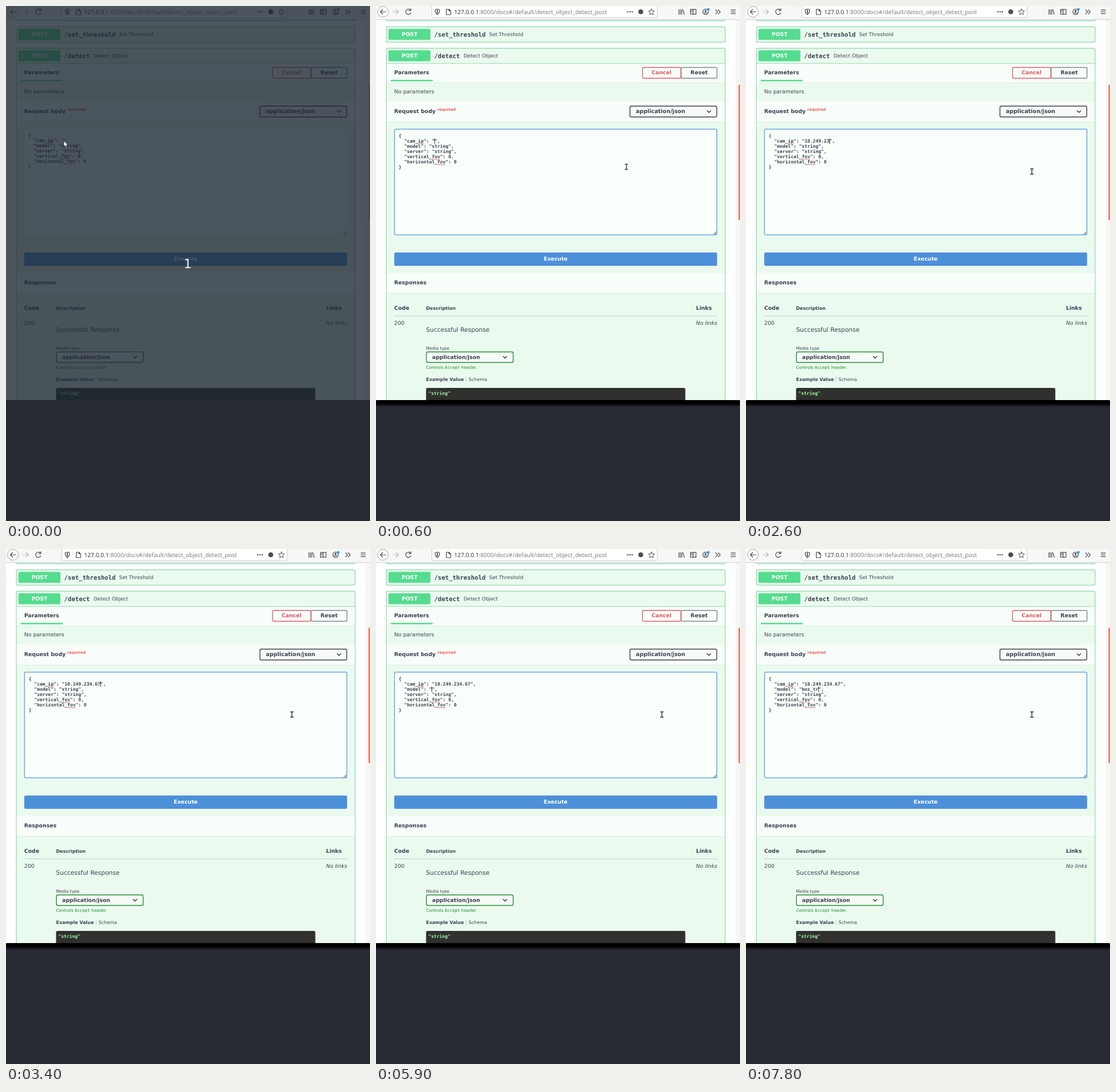
An HTML page for the animation above (8000 ms loop, 629x890 px).

```html
<!DOCTYPE html>
<html lang="en">
<head>
<meta charset="utf-8">
<title>API docs form</title>
<style>
html, body { margin: 0; width: 100%; height: 100%; overflow: hidden; background: #272a32; }
svg { display: block; width: 629px; height: 890px; }
text { font-family: "DejaVu Sans", sans-serif; fill: #3b4151; white-space: pre; text-rendering: geometricPrecision; }
.b { font-weight: 700; }
.i { font-style: italic; }
.mid { text-anchor: middle; }
.mono { font-family: "DejaVu Sans Mono", monospace; font-weight: 700; }
.url { font-family: "Open Sans", sans-serif; }
.icon { fill: none; stroke: #4c4d52; stroke-width: 1.2; stroke-linejoin: round; stroke-linecap: round; }
</style>
</head>
<body>
<svg id="stage" viewBox="0 0 629 890" xmlns="http://www.w3.org/2000/svg"></svg>
<script>
const stage = document.getElementById("stage");
const GREEN = "#55dc8f", EDGE = "#98deb4", TINT = "#ebfaef", PALE = "#f8fefa";
const LOOP = 8000, ADV = 4.768, PITCH = 9.08;

const rect = (x, y, w, h, fill, more = "") =>
  `<rect x="${x}" y="${y}" width="${w}" height="${h}" fill="${fill}" ${more}/>`;
const text = (x, y, size, str, cls = "", fill = "") =>
  `<text x="${x}" y="${y}" font-size="${size}" class="${cls}" ${fill && `style="fill:${fill}"`}>${str}</text>`;
const icon = (d, more = "") => `<path class="icon" d="${d}" ${more}/>`;
const frame = (x, y, w, h, stroke, fill, r = 2.5) =>
  rect(x, y, w, h, fill, `rx="${r}" stroke="${stroke}" stroke-width="1.4"`);
const chevron = (x, y) => icon(`M${x - 3} ${y - 1.5}l3 3l3-3`, 'style="stroke:#33363f;stroke-width:1.4"');

function toolbar() {
  return rect(0, 0, 629, 23.5, "#f7f7f8") + rect(0, 23, 629, 1, "#cfcfd1") +
    '<circle cx="12" cy="10" r="9.3" fill="#fdfdfd" stroke="#a9a9ac"/>' +
    icon("M17 10H7.5M11.5 6L7.5 10l4 4") +
    icon("M29.500 10H38.500M34.800 6L38.800 10l-4 4", 'style="stroke:#b9b9bc"') +
    icon("M59.600 7.200A4.600 4.600 0 1 0 60 12M60.200 4.500v3.400h-3.400") +
    rect(96.500, -3, 389.500, 23, "#fff", 'rx="2.500" stroke="#cbcbce"') +
    icon("M106 5.300l3.800 1.300c0 4-1 6.800-3.800 8.400c-2.800-1.600-3.800-4.400-3.800-8.400z") +
    icon("M106 7.500v5", 'style="stroke-width:1.800"') +
    icon("M121.500 5.500h4.500l3 3v6.500h-7.500zM126 5.500v3h3") +
    text(135, 13.7, 10.15, '<tspan style="fill:#2b2b30">127.0.0.1</tspan>:8000/docs#/default/detect_object_detect_post', "url", "#77777c") +
    [435.3, 439, 442.7].map(x => `<circle cx="${x}" cy="10" r="1.200" fill="#4c4d52"/>`).join("") +
    '<circle cx="457.500" cy="10" r="4.300" fill="#4c4d52"/>' +
    icon("M476 5l1.500 3.400l3.700.4l-2.800 2.500l.8 3.600l-3.200-1.900l-3.200 1.900l.8-3.600l-2.800-2.500l3.700-.4z", 'style="stroke-width:1"') +
    icon("M523.500 6v8.500M526 6v8.500M528.500 6v8.500M530.300 6.200l2.500 8.300") +
    icon("M543.500 5.800h9.500v8.400h-9.500zM548 5.800v8.400M545 8h1.500M545 10h1.500") +
    '<circle class="icon" cx="569.500" cy="10" r="4.700"/><circle cx="569.500" cy="8.700" r="1.700" fill="#4c4d52"/>' +
    icon("M567 12.500q2.500-1.700 5 0") + '<circle cx="574.300" cy="5.800" r="2.300" fill="#23a3e8"/>' +
    icon("M587 6.500l3.500 3.500l-3.500 3.500M591.500 6.500l3.500 3.500l-3.500 3.500") +
    icon("M613.500 6.800h7.500M613.500 10h7.500M613.500 13.200h7.500");
}

function summary(y, path, note) {
  return rect(21.5, y - 9.5, 72.5, 19, GREEN, 'rx="2"') +
    text(58, y + 3.4, 9.24, "POST", "b mid", "#fff") +
    text(100.5, y + 3.5, 10.56, path, "mono") +
    text(path === "/detect" ? 151.5 : 195.5, y + 3, 8.6, note);
}

function page() {
  const header = (y, h) => rect(18.5, y, 584, h, PALE) + rect(18.5, y + h, 584, 0.8, "#d9eadf");
  return rect(0, 0, 629, 681, "#fff") + rect(621.5, 24, 7.5, 657, "#f6f6f7") +
    frame(17.8, 10, 585.5, 15.5, EDGE, TINT) +
    frame(17.8, 36, 585.5, 26.5, EDGE, TINT) + summary(49, "/set_threshold", "Set Threshold") +
    frame(17.8, 73, 585.5, 640, EDGE, TINT) + summary(86, "/detect", "Detect Object") +
    header(99.5, 33) + rect(18, 98.7, 585, 1, EDGE) +
    text(31.5, 118.4, 9.24, "Parameters", "b") + rect(25.5, 127.6, 72.5, 2.6, GREEN) +
    frame(527.3, 106.3, 62, 18.5, "#858a91", PALE, 2) + frame(460.5, 106.3, 66.3, 18.5, "#df6265", PALE, 2) +
    text(493.5, 118.4, 9.24, "Cancel", "b mid", "#dd5a5e") + text(558.3, 118.4, 9.24, "Reset", "b mid") +
    text(31.5, 150.5, 9.24, "No parameters") +
    header(165, 35) + text(31.5, 185.4, 9.24, "Request body", "b") +
    text(106, 181, 6.6, "required", "b", "#ee5c5c") +
    frame(438.8, 173, 150, 18.8, "#41444e", "#f6fbf8") +
    text(449, 185.4, 9.5, "application/json", "b") + chevron(575.3, 182.5) +
    rect(31.5, 426, 558, 23, "#4d90da", 'rx="2.5"') + text(310.500, 440.3, 9.24, "Execute", "b mid", "#fff") +
    header(462, 34) + text(31.5, 481.4, 9.24, "Responses", "b") +
    text(31.5, 525, 9.24, "Code", "b") + text(86.5, 524.8, 7.92, "Description", "b") +
    text(553, 525, 9.24, "Links", "b") + rect(31.5, 535, 558, 1, "#c3d2ca") +
    text(31.5, 551.3, 9.24, "200") + text(553, 551.3, 9.24, "No links", "i") +
    text(86.5, 563, 10.56, "Successful Response") + text(86.5, 593.8, 7.26, "Media type") +
    frame(87.2, 597.7, 149.8, 18.3, "#2a9035", "#f6fbf8") +
    text(97, 610, 9.24, "application/json", "b") + chevron(223, 607) +
    text(86.5, 626.8, 7.26, 'Controls <tspan font-family="DejaVu Sans Mono, monospace">Accept</tspan> header.', "", "#1c8a2a") +
    text(86.5, 647.8, 7.92, "Example Value", "b") + rect(155.4, 640, 0.8, 10, "#bcc5c0") +
    text(160, 647.8, 7.92, "Schema") +
    rect(86.5, 660, 448, 30, "#30312f", 'rx="2.5"') +
    text(90.5, 672.3, 7.92, '"string"', "mono", "#a2fca2");
}

// wavy spelling mark under columns [from, to) of a line
function squiggle(line, from, to) {
  let d = `M${38.3 + from * ADV} ${228 + line * PITCH}`;
  for (let i = 0; i < (to - from) * ADV / 2 - 0.5; i++) d += `l2 ${i % 2 ? 1.3 : -1.3}`;
  return `<path d="${d}" fill="none" stroke="#d8403c" stroke-width=".8"/>`;
}

stage.innerHTML = `
<defs>
  <clipPath id="view"><rect width="629" height="681"/></clipPath>
  <linearGradient id="fade" x2="0" y2="1">
    <stop offset="0"/><stop offset=".5"/><stop offset="1" stop-opacity="0"/>
  </linearGradient>
</defs>
${rect(0, 0, 629, 890, "#272a32")}
<g clip-path="url(#view)">
  ${page()}${toolbar()}
  <rect id="thumb" x="626.300" y="136" width="3" height="234" rx="1"/>
  <rect id="area" x="32" y="212.700" width="557" height="182.800" rx="2.500" fill="#f9fffa" stroke-width="1.500"/>
  <path id="grip" d="M588 389.500v5.500h-5.500zM583 395l5-5" fill="#b9beba" stroke="#949a96" stroke-width=".6"/>
  <g id="json">
    ${[0, 1, 2, 3, 4, 5, 6].map(i => text(38.3, (225.6 + i * PITCH).toFixed(2), 7.92, "", "mono")).join("")}
    ${squiggle(1, 7, 9)}${squiggle(4, 12, 15)}${squiggle(5, 14, 17)}
  </g>
  <rect id="caret" width="1" height="9.500" fill="#30343f"/>
  <g id="veil">
    ${rect(0, 0, 629, 681, "rgb(27,38,49)", 'opacity=".78"')}
    ${text(314, 452.700, 22, "1", "mid", "#edf4f7")}
  </g>
  <path id="arrow" d="M100 233v10l2.300-2l1.700 3.700l1.700-.8l-1.700-3.500h3.200z" fill="#fff" stroke="#15181c" stroke-width=".7"/>
  <g id="beam" fill="none">
    <path d="M-2.800-4.500h2.200l.6.600l.6-.6h2.200M0-4v8M-2.800 4.500h2.200l.6-.6l.6.600h2.200" stroke="#fff" stroke-width="2.600"/>
    <path d="M-2.800-4.500h2.200l.6.600l.6-.6h2.200M0-4v8M-2.800 4.500h2.200l.6-.6l.6.600h2.200" stroke="#22252b" stroke-width="1.300"/>
  </g>
</g>
<rect id="shadow" x="0" y="681" width="629" height="12" rx="4" fill="url(#fade)"/>`;

const el = id => document.getElementById(id);
const lines = [...el("json").querySelectorAll("text")];
const show = (id, on) => el(id).setAttribute("visibility", on ? "visible" : "hidden");
const set = (id, name, value) => el(id).setAttribute(name, value);

// each pair: time, number of characters present from then on
const IP = "10.249.234.67", IP_KEYS = [[1300, 1], [1400, 2], [1600, 3], [1700, 4], [2000, 6], [2300, 7],
  [2600, 9], [2800, 10], [3000, 11], [3100, 12], [3400, 13]];
const ERASE = [[0, 6], [5100, 5], [5200, 4], [5400, 3], [5600, 2], [5700, 1], [5900, 0]];
const MODEL = "box_tr", MODEL_KEYS = [[6700, 1], [6800, 2], [7000, 3], [7300, 4], [7600, 5], [7700, 6]];
const at = (keys, t) => keys.reduce((n, [time, value]) => t >= time ? value : n, 0);

function caretAt(t, ip, model) {
  if (t < 300 || (t >= 4000 && t < 4200) || (t >= 6400 && t < 6700)) return null;
  if (t < 4000) return [1, 13 + ip.length];
  if (t < 4500) return [2, 20];
  if (t < 4700) return [2, 19];
  return [2, 12 + model.length];
}

function draw(time) {
  const t = Math.floor((time % LOOP) / 100) * 100;
  const focus = t >= 300;
  const ip = IP.slice(0, at(IP_KEYS, t));
  const model = t < 6700 ? "string".slice(0, at(ERASE, t)) : MODEL.slice(0, at(MODEL_KEYS, t));
  const body = ["{", `  "cam_ip": "${ip}",`, `  "model": "${model}",`, '  "server": "string",',
    '  "vertical_fov": 0,', '  "horizontal_fov": 0', "}"];
  body.forEach((s, i) => { if (lines[i].textContent !== s) lines[i].textContent = s; });

  set("json", "transform", focus ? "translate(1 1.3)" : "");
  set("area", "stroke", focus ? "#6ea9e4" : "none");
  set("grip", "fill", focus ? "#9fbfd8" : "#b9beba");
  set("thumb", "fill", focus ? "#ee7c62" : "#c3c3c4");
  show("shadow", focus);
  show("veil", t < 100);
  show("arrow", t < 100);
  show("beam", t >= 100);

  const u = Math.min(1, Math.max(0, (t - 300) / 400)), ease = u * u * (3 - 2 * u);
  set("beam", "transform", `translate(${102 + 392 * ease} ${234.5 + 51.5 * ease})`);

  const caret = caretAt(t, ip, model);
  show("caret", caret);
  if (caret) {
    set("caret", "x", Math.floor(39.3 + caret[1] * ADV));
    set("caret", "y", 219.6 + caret[0] * PITCH);
  }
}

const start = performance.now();
function tick() {
  draw(performance.now() - start);
  requestAnimationFrame(tick);
}
tick();
</script>
</body>
</html>
```
